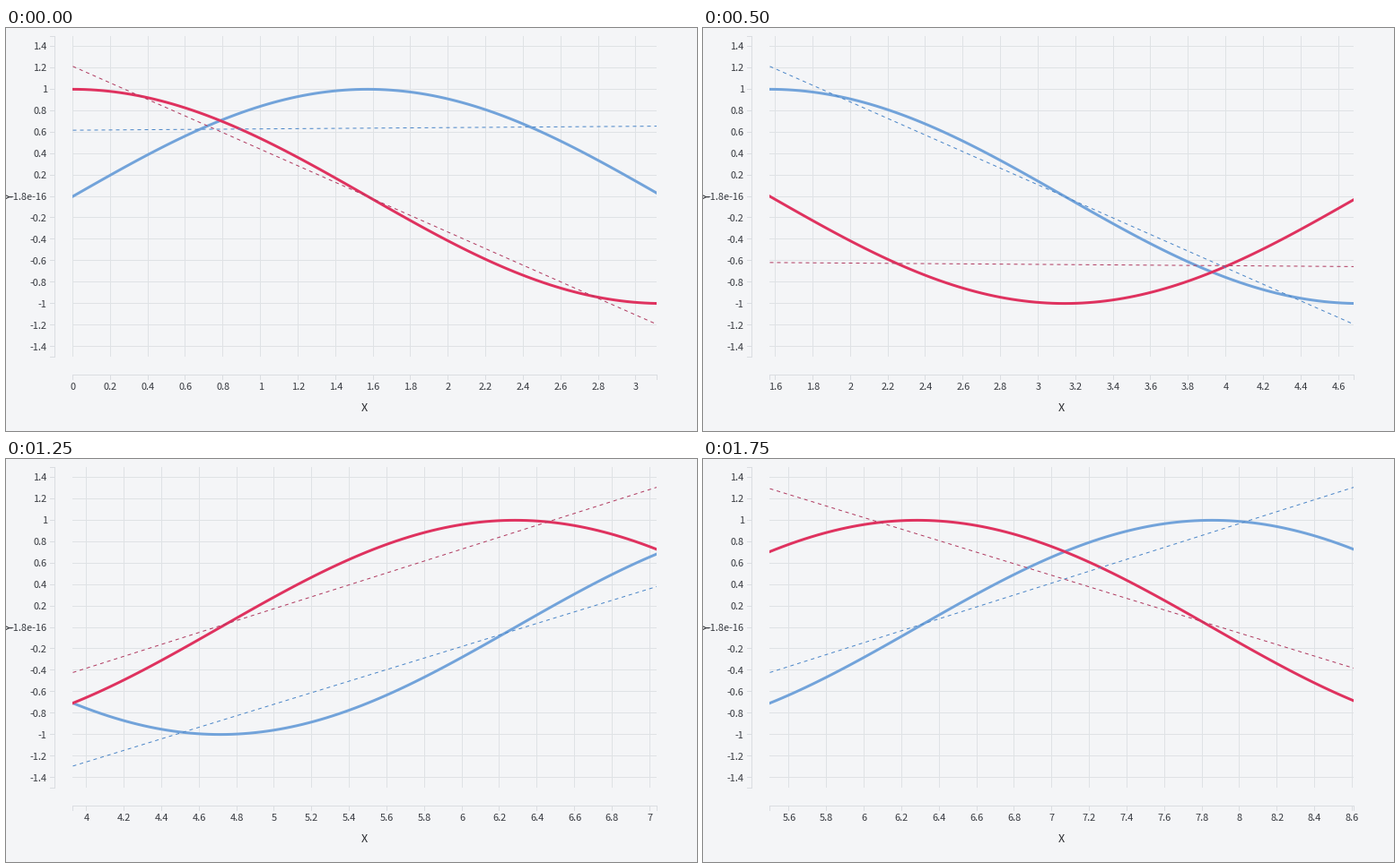
A matplotlib script for the animation above (2000 ms loop, 770 by 450 pixels).

```python
import numpy as np
import matplotlib.pyplot as plt
from matplotlib.animation import FuncAnimation
from matplotlib.patches import Rectangle

W, H, DPI = 770, 450, 100
PX = 72 / DPI
FRAMES, INTERVAL = 8, 250

LEFT, RIGHT = 74.5, 725.0
TOP, BOTTOM = 8.6, 367.4
ZERO, Y_SCALE = 188.0, 119.6
POINTS = 100
STEP = np.pi / POINTS
X_SCALE = (RIGHT - LEFT) / (STEP * (POINTS - 1))

BG, GRID, AXIS = "#f4f5f7", "#dfe2e5", "#dadde1"
TEXT, TITLE = "#36393f", "#26282c"
BLUE, RED = "#72a3da", "#df325f"
BLUE_FIT, RED_FIT = "#4b86c8", "#b03a60"

plt.rcParams["font.family"] = ["Noto Sans CJK JP", "DejaVu Sans"]
plt.rcParams["lines.scale_dashes"] = False

fig = plt.figure(figsize=(W / DPI, H / DPI), dpi=DPI, facecolor=BG)
ax = fig.add_axes([0, 0, 1, 1])
ax.set_xlim(0, W)
ax.set_ylim(H, 0)
ax.axis("off")
plot_area = Rectangle((74, 8), 651, 360, fc="none", ec="none")
ax.add_patch(plot_area)


def crisp(v):
    return np.floor(v) + 0.5


def to_y(value):
    return ZERO - value * Y_SCALE


def rule(x0, y0, x1, y1, color):
    return ax.plot([x0, x1], [y0, y1], color=color, lw=PX, zorder=1,
                   solid_capstyle="butt", snap=False)[0]


def label(x, baseline, text, ha):
    return ax.text(x, baseline, text, ha=ha, va="baseline",
                   size=11 * PX, color=TEXT, zorder=5)


def curve(color, width, **style):
    line, = ax.plot([], [], color=color, lw=width * PX, **style)
    line.set_clip_path(plot_area)
    return line


def draw_static():
    for i in range(-7, 8):
        y = crisp(to_y(i / 5))
        rule(74, y, 725, y, GRID)
        rule(49, y, 54, y, AXIS)
        label(45.7, y + 4, f"{i / 5:g}" if i else "-1.8e-16", "right")
    rule(54.5, 9, 54.5, 368, AXIS)
    for y in (9.5, 367.5):
        rule(49, y, 54, y, AXIS)
    rule(74, 387.5, 726, 387.5, AXIS)
    for x in (74.5, 725.5):
        rule(x, 388, x, 393, AXIS)
    ax.text(399.7, 428.5, "X", ha="center", va="baseline",
            size=12.5 * PX, color=TITLE)
    ax.text(4.5, 188, "Y", ha="center", va="center", rotation=90,
            size=12.5 * PX, color=TITLE)


draw_static()
series = [
    (np.sin, curve(BLUE, 3, zorder=3), curve(BLUE_FIT, 1, zorder=4, dashes=(4 * PX, 4 * PX))),
    (np.cos, curve(RED, 3, zorder=3.5), curve(RED_FIT, 1, zorder=4, dashes=(4 * PX, 4 * PX))),
]
ticks = []


def update(frame):
    start = frame * np.pi / 4
    x = start + STEP * np.arange(POINTS)
    px = LEFT + (x - start) * X_SCALE

    while ticks:
        ticks.pop().remove()
    first = int(np.ceil(start * 5 - 1e-9))
    last = int(np.floor(x[-1] * 5 + 1e-9))
    for i in range(first, last + 1):
        tx = LEFT + (i / 5 - start) * X_SCALE
        cx = crisp(tx)
        ticks.extend([
            rule(cx, 9, cx, 367, GRID),
            rule(cx, 388, cx, 393, AXIS),
            label(tx, 404, f"{i / 5:g}", "center"),
        ])

    for func, line, fit in series:
        y = func(x)
        slope, offset = np.polyfit(x, y, 1)
        ends = x[[0, -1]]
        line.set_data(px, to_y(y))
        fit.set_data(px[[0, -1]], to_y(slope * ends + offset))
    return []


anim = FuncAnimation(fig, update, frames=FRAMES, interval=INTERVAL,
                     init_func=lambda: [], repeat=True, repeat_delay=0)
plt.show()
```
